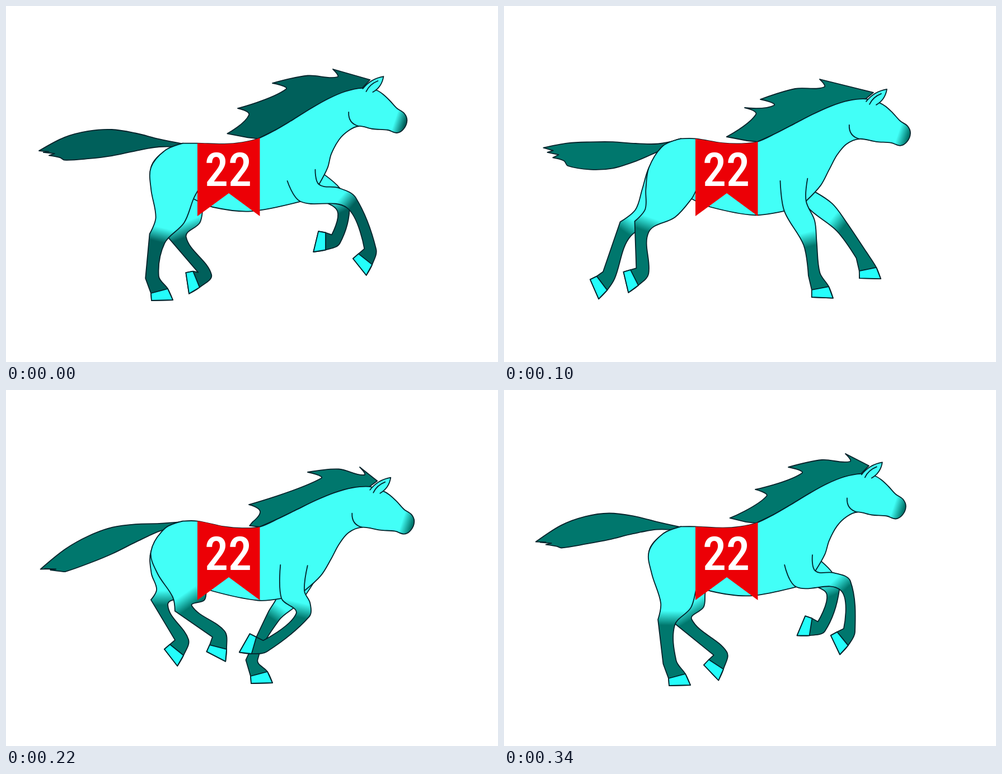
Recreate the animation shown at these times as an HTML page. Size 879 by 637 pixels, loop 360 ms.

```html
<!DOCTYPE html>
<html lang="en">
<head>
<meta charset="utf-8">
<title>Galloping horse</title>
<style>
  html, body { margin: 0; width: 100%; height: 100%; overflow: hidden; background: #fff; }
  svg { display: block; width: 100vw; height: 100vh; }
  .line { fill: none; stroke: #02222a; stroke-width: 1.8; stroke-linejoin: round; stroke-linecap: round; }
  text { font: 500 84px "Roboto Condensed", Roboto, sans-serif; font-stretch: 75%; }
</style>
</head>
<body>
<svg id="stage" viewBox="0 0 879 637"></svg>
<script>
const LOOP = 360, TICK = 20, SKIN = '#42fff7', HOOF = '#24fdfb';
const stage = document.getElementById('stage');

// Key times of the stride; every track below has one entry for each.
const TIMES = [0, 40, 100, 140, 220, 300, 340];

// Legs: knee or hock x,y, top of hoof x,y, hoof tilt in degrees.
const STRIDE = {
  hindNear: [[270,416,274,510,0], [237,422,209,510,0], [246,395,233,486,78], [272,395,300,473,37], [317,391,379,460,29], [326,396,384,470,12], [290,416,309,512,0]],
  hindFar: [[306,414,340,489,83], [286,420,311,510,0], [217,399,175,496,68], [205,368,172,451,77], [274,380,305,465,54], [345,398,395,447,0], [320,414,379,491,48]],
  foreNear: [[617,352,642,453,53], [620,373,669,460,25], [547,425,565,505,4], [495,428,496,513,0], [530,403,443,457,121], [588,362,517,435,90], [610,350,605,445,66]],
  foreFar: [[603,362,571,421,105], [622,372,606,429,88], [602,393,650,471,3], [568,425,616,505,2], [478,405,452,508,0], [563,372,474,437,126], [588,362,548,424,114]]
};

// Tips of the three upper mane tufts.
const TUFTS = [
  [[584,113], [601,111], [564,131], [617,131], [632,138], [610,133], [610,114]],
  [[476,138], [437,160], [458,167], [553,137], [539,147], [535,150], [508,138]],
  [[414,183], [408,193], [430,182], [471,178], [434,205], [452,213], [449,178]]
];

// Skull from chin to brow, moved rigidly.
const SKULL = [[655,219], [682,221], [698,226], [710,219], [716,204], [711,191], [698,182], [685,168], [672,156], [660,149]];

const plus = (p, x, y) => [p[0] + x, p[1] + y];
const mix = (p, q, k) => [p[0] + (q[0] - p[0]) * k, p[1] + (q[1] - p[1]) * k];
const unit = (p, q) => {
  const x = q[0] - p[0], y = q[1] - p[1], len = Math.hypot(x, y) || 1;
  return [x / len, y / len];
};
const turn = (p, x, y, deg) => {
  const a = deg * Math.PI / 180, c = Math.cos(a), s = Math.sin(a);
  return plus(p, x * c - y * s, x * s + y * c);
};
const wave = (t, phase, rate = 1) => Math.cos((t - phase) * rate * 2 * Math.PI / LOOP);

// Smooth periodic interpolation along a track.
function at(track, t) {
  const n = TIMES.length;
  let i = n - 1;
  while (TIMES[i] > t) i--;
  const [a, b, c, d] = [-1, 0, 1, 2].map(o => {
    const k = i + o, lap = Math.floor(k / n);
    return { t: TIMES[k - lap * n] + lap * LOOP, v: track[k - lap * n] };
  });
  const span = c.t - b.t, u = (t - b.t) / span, w = 1 - u;
  return b.v.map((p, k) => {
    const q = c.v[k];
    const m0 = 0.7 * span * (q - a.v[k]) / (c.t - a.t);
    const m1 = 0.7 * span * (d.v[k] - p) / (d.t - b.t);
    return p * (1 + 2 * u) * w * w + m0 * u * w * w + q * u * u * (3 - 2 * u) - m1 * u * u * w;
  });
}

const pt = p => p[0].toFixed(1) + ' ' + p[1].toFixed(1);

// Smooth curve through the points, sharp at the corner indices.
function curve(pts, corners = [], start = 'M') {
  const dir = pts.map((p, i) =>
    !i || i === pts.length - 1 || corners.includes(i) ? [0, 0] : unit(pts[i - 1], pts[i + 1]));
  let d = start + pt(pts[0]);
  for (let i = 1; i < pts.length; i++) {
    const p = pts[i - 1], q = pts[i], h = Math.hypot(q[0] - p[0], q[1] - p[1]) / 3;
    const c1 = plus(p, dir[i - 1][0] * h, dir[i - 1][1] * h);
    const c2 = plus(q, -dir[i][0] * h, -dir[i][1] * h);
    d += `C${pt(c1)} ${pt(c2)} ${pt(q)}`;
  }
  return d;
}

// Trunk: everything follows from how far the head has dipped.
function frame(t) {
  const dip = 20 - 16.6 * wave(t, 7) - 3.1 * wave(t, 18, 2);
  const move = (x, y, kx, ky) => [x + kx * dip, y + ky * dip];
  const withers = move(450, 237, 0.1, 0.25), croup = move(316, 246, 0, -0.36);
  const bend = [move(636, 146, 0.42, 0.85), move(575, 150, 0.42, 0.6), move(515, 210, 0.2, 0.25), withers];
  const crest = [];
  for (let i = 0; i <= 6; i++) {
    const k = i / 6, [a, b, c] = [0, 1, 2].map(j => mix(bend[j], bend[j + 1], k));
    crest.push(mix(mix(a, b, k), mix(b, c, k), k));
  }
  return {
    t, withers, croup, crest,
    shift: move(0, 0, 0.42, 1),
    chin: move(630, 214, 0.2, 1),
    chest: [move(560, 318, -0.85, 1.3), move(575, 288, -0.4, 1.4), move(581, 264, 0, 1.2), move(595, 238, 0, 1.2), move(612, 222, 0, 1.05)],
    back: [move(422, 244, 0, 0.1), move(390, 247, 0, -0.08), move(342, 246, 0, -0.36), croup],
    elbow: move(527, 349, -1.1, 0.75),
    belly: move(437, 367, 0.4, 0.3),
    shoulder: move(503, 313, -0.4, 0),
    breast: move(553, 292, -0.45, 0.7)
  };
}

// Upper outlines: where a leg's rear and front edges run into the trunk.
function hindTop(f, knee, rear, front) {
  const lead = Math.max(0, knee[0] - 270), flank = [335 + lead * 0.5, 345 + lead * 0.3];
  return [
    [f.croup, plus(f.croup, -32, 13), [259, 289], [259 + (rear[0] - 256) / 4, 328], mix(rear, [290, 320], 0.33)],
    [plus(mix(front, flank, 0.5), 9, 3), flank, plus(flank, 8, -15)]
  ];
}
function foreTop(f, knee, rear, front, far) {
  const elbow = far ? plus(mix(f.elbow, [knee[0], f.elbow[1]], 0.4), 0, -8) : f.elbow;
  const join = far ? mix(f.chest[0], f.chest[1], 0.6) : f.chest[0];
  const [dx, dy] = unit(join, front);
  return [
    [far ? plus(elbow, -5, -25) : f.shoulder, elbow],
    [plus(mix(join, front, 0.5), 6 * dy, -6 * dx), join, ...far ? [] : [f.breast]]
  ];
}

function add(tag, attrs, parent = stage) {
  const el = document.createElementNS('http://www.w3.org/2000/svg', tag);
  for (const k in attrs) el.setAttribute(k, attrs[k]);
  return parent.appendChild(el);
}
const shape = (fill, parent) => add('path', { class: 'line', style: 'fill:' + fill }, parent);

const defs = add('defs', {});
function fade(id) {
  const g = add('linearGradient', { id, gradientUnits: 'userSpaceOnUse' }, defs);
  add('stop', { offset: 0, 'stop-color': SKIN }, g);
  const end = add('stop', { offset: 1 }, g);
  return (a, b, dark) => {
    g.setAttribute('x1', a[0]); g.setAttribute('y1', a[1]);
    g.setAttribute('x2', b[0]); g.setAttribute('y2', b[1]);
    end.setAttribute('stop-color', dark);
  };
}

// Rear and front points of a joint, square to the bend of the leg.
function joint(a, p, b, width, lift = 0) {
  const u = unit(a, p), v = unit(p, b), [x, y] = unit([0, 0], [u[0] + v[0], u[1] + v[1]]), h = width / 2;
  return { dir: [x, y], rear: plus(p, -y * h - x * lift, x * h - y * lift), front: plus(p, y * h + x * lift, -x * h + y * lift) };
}

function leg(name) {
  const hind = name.startsWith('hind'), far = name.endsWith('Far');
  const setFade = fade(name), limb = shape(`url(#${name})`), hoof = shape(HOOF);
  return (f, dark) => {
    const [kx, ky, hx, hy, tilt] = at(STRIDE[name], f.t), knee = [kx, ky], band = [hx, hy];
    const pastern = 0.35 * Math.sin(tilt * Math.PI / 180) - 1;
    const ankle = turn(band, 13 * pastern, 25 * pastern, tilt);
    const hip = hind ? [300, 330] : mix(f.elbow, f.chest[0], 0.5);
    const k = joint(hip, knee, ankle, hind ? 30 : 24, hind ? 5 : 0);
    const a = joint(knee, ankle, band, hind ? 24 : 21);
    const foot = [[-15, 4], [-14, 17], [24, 16], [15, -4]].map(([x, y]) => turn(band, x, y, tilt));
    const [rear, front] = (hind ? hindTop : foreTop)(f, knee, k.rear, k.front, far);
    const n = rear.length;
    limb.setAttribute('d', curve([...rear, k.rear, a.rear, ...foot, a.front, k.front, ...front],
      [hind ? n : -1, n + 1, n + 2, n + 3, n + 4]));
    hoof.setAttribute('d', curve(foot, [1, 2]) + 'Z');
    const [x, y] = k.dir;
    setFade(plus(knee, -21 * x, -21 * y), plus(knee, 5 * x, 5 * y), dark);
  };
}

// A tapering brush with a ragged lower tip.
function tailPath({ t, croup }) {
  const tip = [66 + 8 * wave(t, 120), 288 + 40 * wave(t, 235)];
  const mid = 260 + 16 * wave(t, 165), base = croup[1] + 4;
  const spot = (s, side) => {
    const y = base * (1 - s) * (1 - 2 * s) + mid * 4 * s * (1 - s) + tip[1] * s * (2 * s - 1);
    const swell = 3 + 22 * Math.sin(Math.PI * Math.min(s, 0.6) / 1.2) ** 2;
    const taper = Math.sqrt(1 - Math.max(0, (s - 0.6) / 0.4) ** 2);
    return [croup[0] + (tip[0] - croup[0]) * s, y + side * swell * taper];
  };
  const pts = [], corners = [];
  for (let i = 0; i < 6; i++) pts.push(spot(i / 6, -1));
  pts.push(plus(tip, -3, -6));
  for (let i = 0; i < 5; i++) {
    corners.push(pts.length - 1);
    pts.push(plus(spot(0.97 - i * 0.02, (i - 1) / 4), i % 2 ? -8 : 7, 0));
  }
  for (let i = 5; i >= 0; i--) pts.push(spot(i / 6, 1));
  return curve(pts, corners);
}

// Tufts blown back from the brow to the withers.
function manePath({ t, shift, withers, crest }) {
  const [a, b, c] = TUFTS.map(track => at(track, t));
  const notch = plus(a, 8, 14), last = plus(withers, -38 - 26 * wave(t, 50), -9);
  const pts = [plus(shift, 650, 131), a, notch, plus(mix(notch, b, 0.5), 5, -8), b, plus(b, 24, 11), c, plus(c, 20, 12), last, plus(withers, -18, -2)];
  return curve(pts, [1, 4, 6, 8]) + 'L' + [...crest].reverse().map(pt).join('L') + 'Z';
}

const tail = shape('none'), mane = shape('none');
const farLegs = [leg('hindFar'), leg('foreFar')];
const muzzle = fade('muzzle');
const body = add('path', { fill: 'url(#muzzle)' }), edge = shape('none');
const nearLegs = [leg('hindNear'), leg('foreNear')];

const head = add('g', {});
add('path', { class: 'line', style: 'fill:' + SKIN, d: 'M637 147Q651 129 674 125Q671 144 655 153' }, head);
add('path', { class: 'line', d: 'M643 152Q649 139 664 133' }, head);
const jaw = shape('none');

const clip = add('clipPath', { id: 'cloth' }, defs);
const clipBody = add('path', {}, clip);
add('rect', { x: 330, y: 300, width: 140, height: 90 }, clip);
add('path', { d: 'M342 225H453.5V376L398 335L342 376Z', fill: '#ec0006', 'clip-path': 'url(#cloth)' });
add('text', { x: 397, y: 322, fill: '#fff', 'text-anchor': 'middle' }).textContent = '22';

function draw(t) {
  const f = frame(t), dark = t < 60 ? '#00605b' : '#00776d';
  const [dx, dy] = f.shift;
  const top = [...f.chest, f.chin, ...SKULL.map(p => plus(p, dx, dy)), ...f.crest, ...f.back];
  const belly = curve([[335, 345], [370, 360], f.belly, f.elbow]);
  const outline = belly + curve(top, [], 'L') + 'Z';

  tail.setAttribute('d', tailPath(f));
  mane.setAttribute('d', manePath(f));
  tail.style.fill = mane.style.fill = dark;
  body.setAttribute('d', outline);
  clipBody.setAttribute('d', outline);
  edge.setAttribute('d', belly + curve(top));
  muzzle([695 + dx, 201 + dy], [713 + dx, 207 + dy], dark);
  for (const pose of [...farLegs, ...nearLegs]) pose(f, dark);

  head.setAttribute('transform', `translate(${dx} ${dy})`);
  jaw.setAttribute('d', `M${pt(plus(f.chin, -18, -25))}Q${pt(plus(f.chin, -19, -5))} ${pt(f.chin)}`);
}

function loop(now) {
  draw(Math.floor((now % LOOP) / TICK) * TICK);
  requestAnimationFrame(loop);
}
draw(0);
requestAnimationFrame(loop);
</script>
</body>
</html>
```
